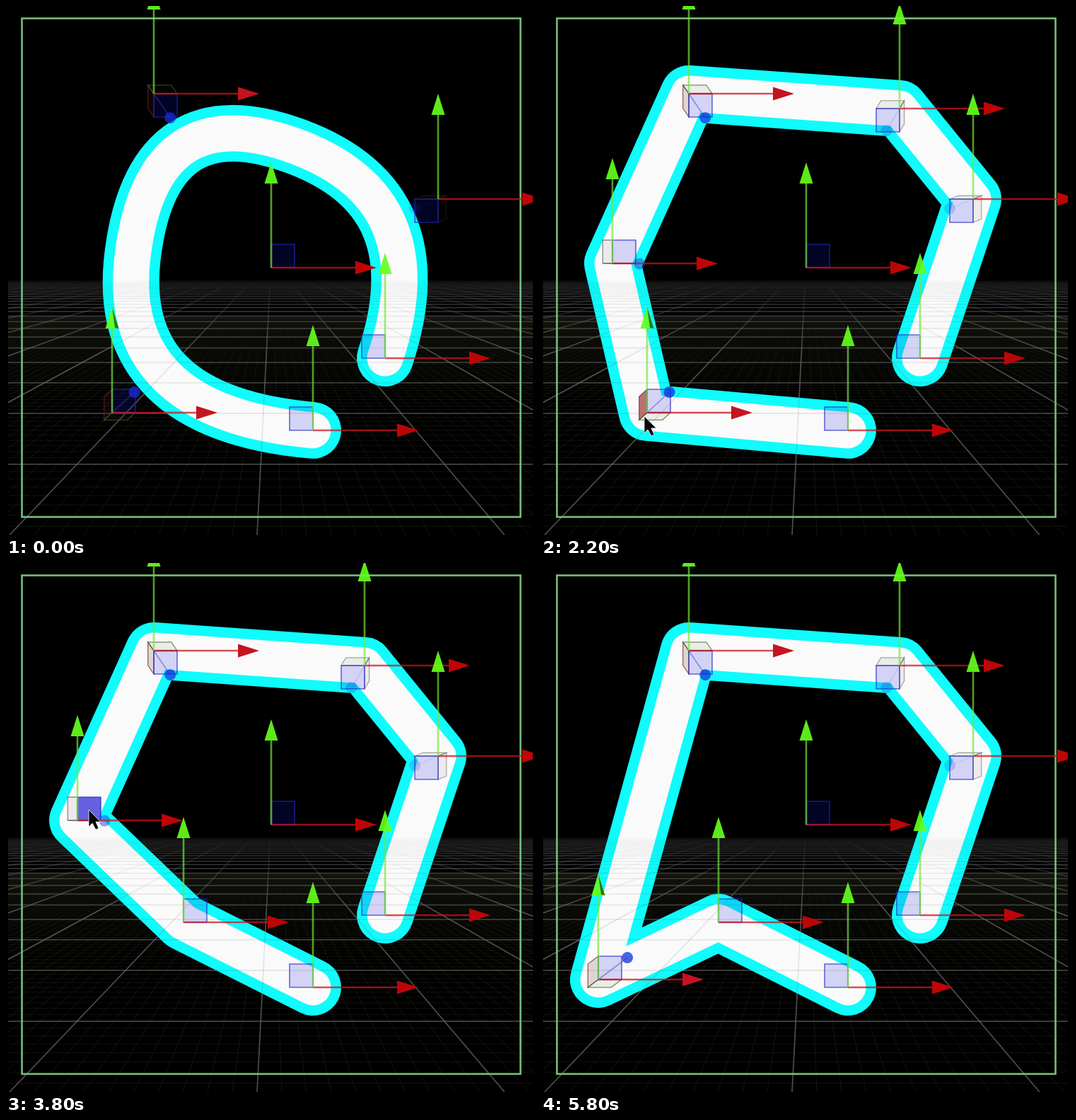
Animation of 748 by 748 pixels, one loop 6 s. Source, as an HTML page with a canvas:

```html
<!DOCTYPE html>
<html>
<head>
<meta charset="utf-8">
<style>
html, body { margin: 0; width: 100%; height: 100%; overflow: hidden; background: #000; }
canvas { display: block; width: 100vw; height: 100vh; }
</style>
</head>
<body>
<canvas id="stage" width="748" height="748"></canvas>
<script>
const ctx = document.getElementById('stage').getContext('2d');
const LOOP = 6000, SIZE = 748, BOX = 33;
const HORIZON = 360, VIEW_X = 375, VIEW_Y = 368;
const POLYLINE_AT = 1500;
const clamp = v => Math.max(0, Math.min(1, v));
const smooth = u => u * u * (3 - 2 * u);

// Tracks are lists of [time, x, y], eased between neighbours.
const lowerTrack = [[2500, 150, 575], [3200, 251, 508]];
const leftTrack = [[3800, 101, 364], [4400, 81, 589]];
const cursorTrack = [
  [1800, 130, 760], [2200, 146, 580], [2400, 173, 570], [2500, 173, 570],
  [3200, 274, 503], [3300, 274, 503], [3800, 117, 349],
  [4400, 97, 574], [4500, 97, 574], [4800, 40, 760]
];

function follow(track, t) {
  let i = 0;
  while (i < track.length - 2 && t >= track[i + 1][0]) i++;
  const [t0, x0, y0] = track[i], [t1, x1, y1] = track[i + 1];
  const u = smooth(clamp((t - t0) / (t1 - t0)));
  return [x0 + (x1 - x0) * u, y0 + (y1 - y0) * u];
}

function polygon(points, fill, stroke, width = 1.3) {
  ctx.beginPath();
  points.forEach(p => ctx.lineTo(p[0], p[1]));
  ctx.closePath();
  if (fill) { ctx.fillStyle = fill; ctx.fill(); }
  if (stroke) { ctx.strokeStyle = stroke; ctx.lineWidth = width; ctx.stroke(); }
}

function line(x0, y0, x1, y1, color, width) {
  ctx.beginPath();
  ctx.moveTo(x0, y0);
  ctx.lineTo(x1, y1);
  ctx.strokeStyle = color;
  ctx.lineWidth = width;
  ctx.stroke();
}

function drawTube(points, curved) {
  const last = points.length - 1;
  ctx.beginPath();
  ctx.moveTo(...points[0]);
  for (let i = 1; i <= last; i++) {
    const [x, y] = points[i];
    if (!curved) ctx.lineTo(x, y);
    else if (i < last) {
      const [nx, ny] = points[i + 1];
      const end = i === last - 1 ? [nx, ny] : [(x + nx) / 2, (y + ny) / 2];
      ctx.quadraticCurveTo(x, y, ...end);
    }
  }
  ctx.lineCap = ctx.lineJoin = 'round';
  for (const [color, width] of [['#10fbfb', 80], ['#fafafa', 51]]) {
    ctx.strokeStyle = color;
    ctx.lineWidth = width;
    ctx.stroke();
  }
  ctx.lineCap = 'butt';
  ctx.lineJoin = 'miter';
}

function verticalFade(color, peak, from) {
  const g = ctx.createLinearGradient(0, from, 0, SIZE);
  g.addColorStop(0, `rgba(${color},0)`);
  g.addColorStop(.3, `rgba(${color},${peak})`);
  g.addColorStop(1, `rgba(${color},${peak})`);
  return g;
}

function drawMajorGrid() {
  const top = 388, color = verticalFade('140,140,140', .62, top);
  for (let n = 3; n <= 30; n++) {
    const y = HORIZON + 864 / n;
    line(0, y, SIZE, y, `rgba(140,140,140,${.6 * clamp(1.1 - n / 30)})`, 1.4);
  }
  for (let m = -16; m <= 16; m++) drawRay(m, top, color, 1.6);
}

function drawMinorGrid() {
  const top = 440, color = verticalFade('130,130,90', .14, top);
  for (let i = 23; i < 110; i++) {
    const y = HORIZON + 8640 / i;
    if (i % 10) line(0, y, SIZE, y, 'rgba(130,130,90,.13)', 1);
  }
  for (let m = -160; m <= 160; m++) {
    if (m % 10) drawRay(m / 10, top, color, 1);
  }
}

function drawRay(m, top, color, width) {
  const drop = SIZE - HORIZON, spread = -20 + 350 * m;
  line(VIEW_X + spread * (top - HORIZON) / drop, top, VIEW_X + spread, SIZE, color, width);
}

function drawArrow(x, y, dx, dy, shaft, cone, shade) {
  const at = (along, side) => [x + dx * along - dy * side, y + dy * along + dx * side];
  line(x, y, ...at(119, 0), shaft, 2.7);
  polygon([at(119, -9.5), at(149, 0), at(119, 9.5)], cone);
  if (shade) polygon([at(119, 9.5), at(149, 0), at(120, 4)], 'rgba(20,45,10,.65)');
}

function drawHandle([x, y], { dragging, active, hover } = {}) {
  const vx = VIEW_X - x, vy = VIEW_Y - y;
  const distance = Math.hypot(vx, vy);
  const visible = clamp((distance - 247) / 50);
  const sx = dragging || vx >= 0 ? BOX : -BOX;
  const sy = dragging || vy <= 6 ? -BOX : BOX;
  const ox = -vx * .05, oy = -vy * .05;
  const tint = distance > 290;

  if (visible > 0 && !active) {
    const alpha = .3 + visible * .4;
    polygon([[x, y], [x, y + sy], [x + ox, y + sy + oy], [x + ox, y + oy]],
      hover === 'side' ? 'rgba(150,40,40,.65)' : `rgba(90,25,25,${tint ? .17 : .07})`,
      tint ? `rgba(110,35,35,${alpha})` : `rgba(45,45,45,${alpha})`);
    polygon([[x, y], [x + sx, y], [x + sx + ox, y + oy], [x + ox, y + oy]],
      'rgba(40,90,20,.08)', tint ? `rgba(65,95,40,${alpha})` : `rgba(45,50,40,${alpha})`);
  }

  if (visible > 0) {
    const dotX = x + vx * .14, dotY = y + vy * .14;
    const dot = active ? '175,175,175' : '18,50,220';
    line(x, y, dotX, dotY, `rgba(60,70,190,${visible * .5})`, 1.6);
    ctx.beginPath();
    ctx.arc(dotX, dotY, 8, 0, 7);
    ctx.fillStyle = `rgba(${dot},${active ? .5 : .08 + visible * .68})`;
    ctx.fill();
  }

  const fill = active ? 'rgba(205,195,0,.88)'
    : hover === 'front' ? 'rgba(45,40,215,.72)' : 'rgba(20,20,220,.17)';
  polygon([[x, y], [x + sx, y], [x + sx, y + sy], [x, y + sy]],
    fill, active ? 'rgba(225,220,40,.8)' : 'rgba(30,40,195,.68)', 1.6);

  drawArrow(x, y, 1, 0, active ? 'rgba(235,235,65,.8)' : 'rgba(205,20,30,.74)',
    active ? '#f2f22a' : tint ? '#c41420' : '#bd0508');
  drawArrow(x, y, 0, -1, active ? 'rgba(235,235,65,.8)' : 'rgba(115,230,55,.68)',
    active ? '#f2f22a' : 'rgba(100,255,28,.92)', tint && vy < 0);
}

function drawCursor(x, y) {
  const shape = [[0, 0], [0, 24], [5, 19], [10, 28], [14, 26], [10, 17], [17, 17]];
  polygon(shape.map(p => [x + p[0], y + p[1]]), '#050505', 'rgba(255,255,255,.75)', 1);
}

function draw(t) {
  const curved = t < POLYLINE_AT;
  const dragLower = t >= 2500 && t < 3200;
  const dragLeft = t > 3800 && t <= 4500;
  const dragging = dragLower || dragLeft;
  const lower = { point: follow(lowerTrack, t), active: dragLower,
    hover: t >= 2200 && t < 2400 ? 'side' : t >= 2400 && t < 2500 ? 'front' : '' };
  const left = { point: follow(leftTrack, t), active: dragLeft,
    hover: t >= 3700 && t <= 3800 ? 'front' : '' };
  let nodes = [{ point: [434, 600] }, lower, left, { point: [209, 124] },
    { point: [507, 145] }, { point: [611, 273] }, { point: [536, 498] }];
  if (curved) nodes = nodes.filter((_, i) => i !== 2 && i !== 4);

  ctx.fillStyle = '#000';
  ctx.fillRect(0, 0, SIZE, SIZE);
  ctx.save();
  ctx.beginPath();
  ctx.rect(3, 0, 742, SIZE);
  ctx.clip();
  drawMinorGrid();
  drawMajorGrid();
  drawTube(nodes.map(n => n.point), curved);

  // The main grid lines shine faintly through the tube.
  ctx.save();
  ctx.globalCompositeOperation = 'multiply';
  ctx.globalAlpha = .35;
  drawMajorGrid();
  ctx.restore();

  ctx.strokeStyle = '#79bd79';
  ctx.lineWidth = 2.6;
  ctx.strokeRect(22.5, 17.5, 705, 705);
  drawHandle([375, 370], { dragging: true });
  nodes.forEach(n => drawHandle(n.point, { dragging, active: n.active, hover: n.hover }));
  if (t >= 1800 && t < 4800) drawCursor(...follow(cursorTrack, t));
  ctx.restore();
}

// The picture steps seven times a second, on tenths of a second.
function stepTime(t) {
  const tenth = Math.floor(t / 100);
  const step = Math.ceil((tenth + 1) * 7 / 10) - 1;
  return Math.floor(step * 10 / 7) * 100;
}

const start = performance.now();
function tick() {
  draw(stepTime((performance.now() - start) % LOOP));
  requestAnimationFrame(tick);
}
tick();
</script>
</body>
</html>
```
